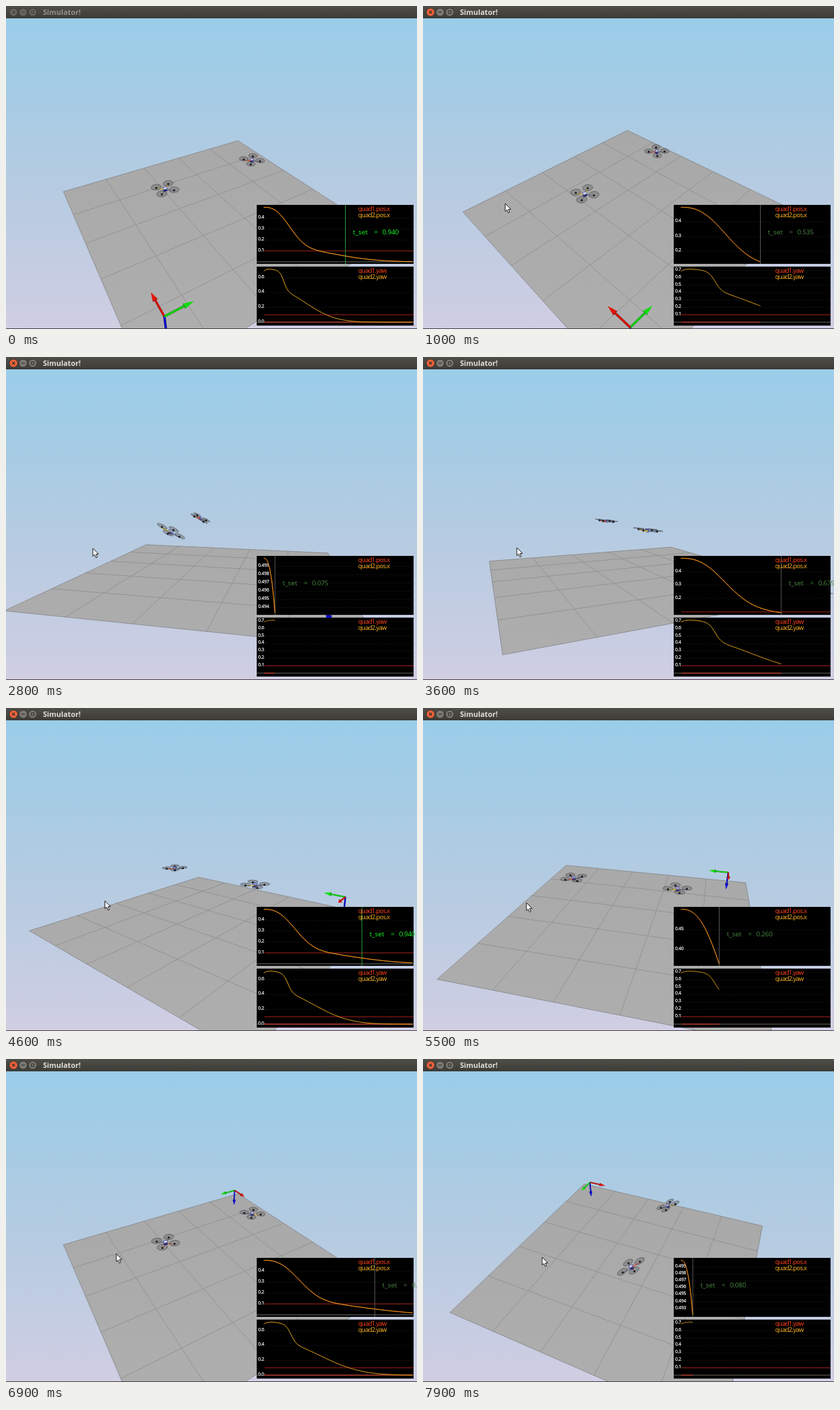
These frames come from a looping animation (600 by 471 pixels, 8000 ms). An HTML page with a canvas:

```html
<!DOCTYPE html>
<html lang="en">
<head>
<meta charset="utf-8">
<title>Simulator!</title>
<style>
  html, body { margin: 0; width: 100%; height: 100%; overflow: hidden; background: #b4cbe1; }
  canvas { display: block; }
</style>
</head>
<body>
<canvas id="stage" width="600" height="471"></canvas>
<script>
const ctx = document.getElementById('stage').getContext('2d');
const { sin, cos, exp, PI } = Math;
const LOOP = 8000, STEP = 100, RAD = PI / 180;
const FOCAL = 486, DIST = 6.54, CX = 300, CY = 244;
const FLOOR = 2.5, FLOOR_Z = -1, CELLS = 5;
const FOCUS_AT = 600, SETTLE = 0.94;
const SANS = '"Open Sans", "Noto Sans", sans-serif';

// Mouse drags: time, camera heading and elevation, pointer x and y
const DRAGS = [
  [0, 328, 32, 128, 296],
  [1000, 314.5, 36.3, 120, 288],
  [2100, 314.8, 9.7, 118, 280],
  [3600, 246, 5.5, 137, 278],
  [5500, 194, 23.5, 151, 284],
  [6900, 148, 32, 161, 284],
  [7900, 113.5, 38, 174, 289]
];
// Simulation runs: start time and speed
const RUNS = [[-2090, 0.82], [348, 0.82], [2700, 0.75], [5140, 0.716], [7790, 0.73]];

// Responses over simulated seconds
const decay = (t, tau, power) => exp(-((t / tau) ** power));
const position = t => 0.36 * decay(t, 0.353, 2.6) + 0.14 * decay(t, 0.95, 2.5);
const turn = t => 0.25 / (1 + exp((t - 0.23) / 0.022)) + 0.47 * decay(t, 0.6, 2.4) - 0.03 * exp(-t / 0.02);
const pitch = t => 0.8 * exp(-3 * t) * sin(2 * PI * t / 0.54);

function dragAt(t) {
  const next = DRAGS.find(d => d[0] > t);
  if (!next) return DRAGS[DRAGS.length - 1];
  const prev = DRAGS[DRAGS.indexOf(next) - 1];
  const u = (t - prev[0]) / (next[0] - prev[0]);
  return prev.map((v, i) => v + (next[i] - v) * u);
}

function simAt(t) {
  const [start, speed] = RUNS.filter(r => r[0] <= t).pop();
  return (t - start) * speed / 1000;
}

let view;
function setView(heading, elevation) {
  const a = heading * RAD, e = elevation * RAD;
  view = { sa: sin(a), ca: cos(a), se: sin(e), ce: cos(e) };
}

// Returns screen x, screen y and depth
function project([x, y, z]) {
  const right = x * view.sa + y * view.ca, ahead = x * view.ca - y * view.sa;
  const depth = DIST + ahead * view.ce - z * view.se;
  const k = FOCAL / depth;
  return [CX + right * k, CY - (ahead * view.se + z * view.ce) * k, depth];
}

function path(points, close) {
  ctx.beginPath();
  points.forEach(p => ctx.lineTo(p[0], p[1]));
  if (close) ctx.closePath();
}

function line(points, color, width = 1, close = false) {
  path(points, close);
  ctx.strokeStyle = color;
  ctx.lineWidth = width;
  ctx.stroke();
}

function fill(points, color) {
  path(points, true);
  ctx.fillStyle = color;
  ctx.fill();
}

function rect(x, y, w, h, color) {
  ctx.fillStyle = color;
  ctx.fillRect(x, y, w, h);
}

function dot(x, y, r, color) {
  ctx.beginPath();
  ctx.arc(x, y, r, 0, 7);
  ctx.fillStyle = color;
  ctx.fill();
}

function text(str, x, y, size, color, weight = 400, spacing = 0) {
  ctx.font = `${weight} ${size}px ${SANS}`;
  ctx.letterSpacing = spacing + 'px';
  ctx.fillStyle = color;
  ctx.fillText(str, x, y);
}

function vertical(y0, y1, ...colors) {
  const g = ctx.createLinearGradient(0, y0, 0, y1);
  colors.forEach((c, i) => g.addColorStop(i / (colors.length - 1), c));
  return g;
}

function drawFloor() {
  const s = FLOOR, at = (x, y) => project([x, y, FLOOR_Z]);
  fill([at(-s, -s), at(s, -s), at(s, s), at(-s, s)], vertical(180, 471, '#a8a8a8', '#afaeaf'));
  for (let i = 0; i <= CELLS; i++) {
    const v = -s + 2 * s * i / CELLS;
    const color = i % CELLS ? '#8d8d8e' : '#838385';
    line([at(v, -s), at(v, s)], color, 0.8);
    line([at(-s, v), at(s, v)], color, 0.8);
  }
}

function drawAxes() {
  const o = [-2, -2, -0.555], length = 0.46;
  const start = project(o);
  const axes = [['#e01408', '#900c06'], ['#12dc12', '#0a8c0a'], ['#0808d8', '#040480']].map(([color, dark], axis) => {
    const along = k => project(o.map((v, i) => i === axis ? v + (axis === 2 ? -k : k) : v));
    return { neck: along(length * 0.66), tip: along(length), color, dark };
  });
  axes.sort((a, b) => b.tip[2] - a.tip[2]);
  for (const { neck, tip, color, dark } of axes) {
    const k = FOCAL / neck[2];
    line([start, neck], dark, Math.max(1.4, 0.032 * k));
    line([start, neck], color, Math.max(1, 0.02 * k));
    const dx = tip[0] - neck[0], dy = tip[1] - neck[1];
    const w = 0.04 * k / (Math.hypot(dx, dy) || 1);
    const base = [[neck[0] - dy * w, neck[1] + dx * w], [neck[0] + dy * w, neck[1] - dx * w]];
    fill([...base, tip], color);
    line(base, dark);
  }
}

function drawQuad({ x, y, yaw, tilt, front }) {
  const cy = cos(yaw), sy = sin(yaw), ct = cos(tilt), st = sin(tilt);
  const body = (bx, by, bz = 0) => {
    const wx = bx * cy - by * sy, wy = bx * sy + by * cy;
    return project([x + wx * ct - bz * st, y + wy, wx * st + bz * ct - 0.02]);
  };
  const ring = (cx, cy, r, z, n) => Array.from({ length: n }, (_, i) => {
    const q = (2 * i + 1) * PI / n;
    return body(cx + r * cos(q), cy + r * sin(q), z);
  });
  const arm = 0.122, hub = body(0, 0);
  const rotors = [[arm, arm], [arm, -arm], [-arm, arm], [-arm, -arm]];
  rotors.forEach(([a, b]) => line([hub, body(a, b)], a > 0 ? front : '#62668a', 1.3));
  for (const [a, b] of rotors) {
    const rim = ring(a, b, 0.092, 0.025, 24), mid = body(a, b, 0.01);
    fill(rim, 'rgba(118,118,121,.55)');
    line(rim, 'rgba(62,62,66,.7)', 0.8, true);
    dot(mid[0], mid[1], 1.5, '#1a1a20');
  }
  fill(ring(0, 0, 0.05, -0.02, 4), '#2b2f6e');
  const lid = ring(0, 0, 0.05, 0.03, 4);
  fill(lid, '#d9dcec');
  line(lid, '#464c98', 0.9, true);
}

function drawQuads(sim) {
  const x = position(sim), tilt = pitch(sim);
  const depth = q => project([q.x, q.y, 0])[2];
  [
    { x, y: -1, yaw: turn(sim), tilt, front: '#e0b020' },
    { x, y: 1, yaw: 0, tilt, front: '#e0431c' }
  ].sort((a, b) => depth(b) - depth(a)).forEach(drawQuad);
}

// Steps run 0.001, 0.005, 0.01, 0.05, 0.1
function pickStep(range) {
  let step = 0.001, factor = 5;
  while (step < 0.09 && range / step > (factor === 5 ? 8 : 4)) {
    step *= factor;
    factor = 7 - factor;
  }
  return step;
}

function drawTicks(step, toY, top, bottom, from) {
  const digits = Math.max(1, Math.ceil(-Math.log10(step) - 1e-6));
  for (let i = Math.ceil(from / step - 1e-6); i * step < 0.75; i++) {
    const y = toY(i * step);
    if (y < top || y > bottom) continue;
    ctx.setLineDash([1, 2]);
    line([[377, y], [595, y]], '#2a2a2a', 0.8);
    ctx.setLineDash([]);
    text((i * step).toFixed(digits), 368, y + 0.5, 7, '#fff', 600, -0.4);
  }
}

function drawTrace(response, sim, toX, toY, color, width) {
  const n = 120;
  line(Array.from({ length: n + 1 }, (_, i) => {
    const s = sim * i / n;
    return [toX(s), toY(response(s))];
  }), color, width);
}

function level(y, color, x0 = 377, x1 = 595) {
  line([[x0, y], [x1, y]], color);
}

function drawLegend(name, y) {
  ['#ff4018', '#ffb31c'].forEach((color, i) =>
    text(`quad${i + 1}.${name}`, 514, y + 9 * i, 9.5, color, 500, -0.75));
}

function drawPositionChart(sim, toX) {
  rect(366, 290, 229, 86, '#000');
  const low = sim > 1.2 ? 0 : position(sim), range = Math.max(0.001, 0.5 - low);
  const toY = v => 293.5 + (0.5 - v) / range * 79.5;
  drawTicks(pickStep(range), toY, 300, 371, low);
  if (toY(0.1) < 374) level(toY(0.1), '#9c2416');
  if (toY(0) < 376) level(toY(0), '#6c6c6c', 366);

  const settled = sim > 1.35, mark = Math.min(sim, SETTLE), x = toX(mark);
  line([[x, 290], [x, 376]], settled ? '#2c982c' : '#565656');
  drawTrace(position, sim, s => toX(s) - 0.4, toY, '#d84010', 0.8);
  drawTrace(position, sim, toX, toY, '#f0a41c', 1);
  drawLegend('pos.x', 299);

  const color = settled ? '#18ff28' : '#4a8a42';
  const value = (Math.round(mark * 200) / 200).toFixed(3);
  text('t_set', x + 11, 333, 9.8, color);
  text('=', x + 42, 333, 9.8, color);
  text(value, x + 54, 333, 9.8, color, 400, -0.3);
}

function drawYawChart(sim, toX) {
  rect(366, 380, 229, 86, '#000');
  const toY = v => 461 - 107.7 * v, wide = sim > 1;
  drawTicks(wide ? 0.2 : 0.1, toY, 384, wide ? 462 : 455, 0);
  level(toY(0.1), '#a81c1c');
  level(toY(0), '#6c6464', 366);
  level(toY(0), '#d82c14', 377, toX(sim));
  drawTrace(turn, sim, toX, toY, '#e8a41c', 1);
  drawLegend('yaw', 389);
}

function drawTitleBar(active) {
  rect(0, 0, 600, 18, vertical(0, 18, '#504e48', '#3c3b37'));
  const glyph = active ? '#35332f' : '#45433e';
  [11, 25, 39].forEach((x, i) => {
    dot(x, 9, 6.2, '#33312d');
    dot(x, 9, 5.6, !active ? '#66645d' : i ? '#7b7972' : '#f0623a');
    if (i === 0) {
      line([[x - 2, 7], [x + 2, 11]], glyph, 1.1);
      line([[x + 2, 7], [x - 2, 11]], glyph, 1.1);
    } else if (i === 1) {
      line([[x - 2.5, 9], [x + 2.5, 9]], glyph, 1.2);
    } else {
      ctx.strokeRect(x - 2, 7, 4, 4);
    }
  });
  text('Simulator!', 54, 13, 10.6, active ? '#e2ded6' : '#948f86', 700);
}

function drawPointer(x, y) {
  const shape = [[0, 0], [0, 11.5], [2.6, 9.2], [4.5, 13.6], [6.5, 12.7], [4.6, 8.5], [8.2, 8.3]]
    .map(([dx, dy]) => [x + dx, y + dy]);
  fill(shape, '#fff');
  line(shape, '#1c1c1c', 1, true);
}

function draw(t) {
  const [, heading, elevation, px, py] = dragAt(t);
  const sim = simAt(t), active = t >= FOCUS_AT;
  const toX = s => 376.5 + s * 217 / Math.max(1, sim);
  setView(heading, elevation);
  rect(0, 18, 600, 453, vertical(18, 471, '#9acde9', '#b3cbe1', '#d0cee3'));
  drawFloor();
  drawAxes();
  drawQuads(sim);
  drawPositionChart(sim, toX);
  drawYawChart(sim, toX);
  rect(0, 470, 600, 1, '#4c3f4a');
  drawTitleBar(active);
  if (active) drawPointer(px, py);
}

const begin = performance.now();
function tick() {
  const t = (performance.now() - begin) % LOOP;
  draw(Math.floor(t / STEP) * STEP);
  requestAnimationFrame(tick);
}
tick();
</script>
</body>
</html>
```
